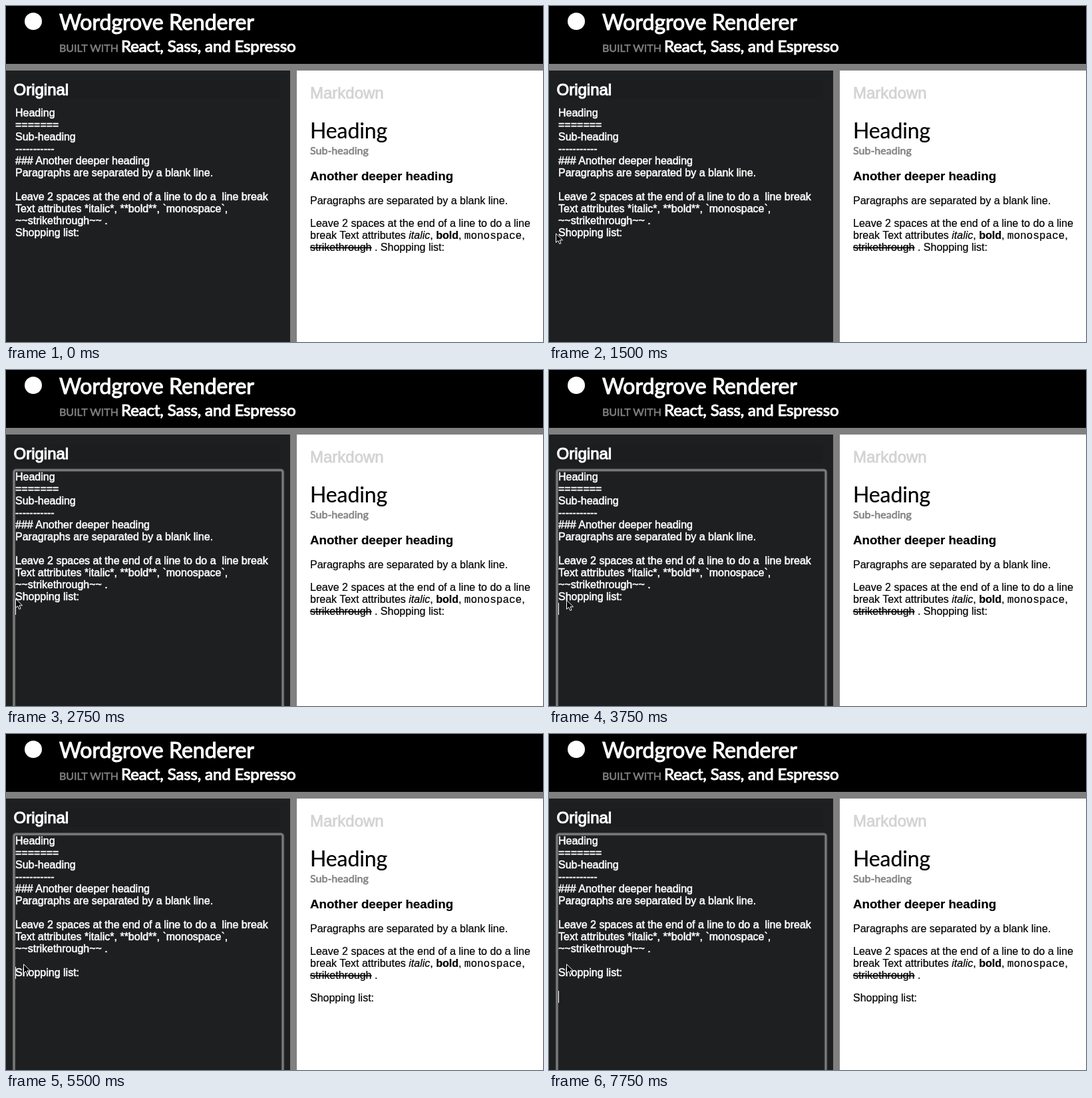
Recreate the animation shown at these times as an HTML page. Size 807x505 px, loop 8 s.

```html
<!DOCTYPE html>
<html lang="en">
<head>
<meta charset="utf-8">
<title>Wordgrove Renderer</title>
<style>
html, body { margin: 0; width: 100%; height: 100%; overflow: hidden; background: #808080; }
svg { display: block; }
text { font: 16px "Liberation Sans", Arial, sans-serif; white-space: pre; stroke: #000; stroke-width: .2; }
.lato { font-family: Lato, sans-serif; }
.white { fill: #fff; stroke: #fff; stroke-width: .55; }
.gray { fill: #808080; stroke: #808080; stroke-width: .6; }
.pale { fill: #d3d3d3; stroke: #d3d3d3; stroke-width: .8; }
.thick { stroke-width: 1.1; }
.tight { letter-spacing: -.12px; }
.h1 { font-size: 32px; }
.h2 { font-size: 24px; }
.h3 { font-size: 18.72px; font-weight: bold; }
.mono { font-family: "Liberation Mono", monospace; }
#ring rect { fill: none; }
</style>
</head>
<body>
<svg width="807" height="505" viewBox="0 0 807 505">
  <rect width="807" height="87"/>
  <rect y="97" width="427" height="408" fill="#1d1f20"/>
  <rect x="12" y="112" width="400" height="28" fill="#1b1d1e"/>
  <rect x="437" y="97" width="370" height="408" fill="#fff"/>

  <circle cx="41" cy="23" r="13" fill="#fff"/>
  <text class="lato white thick h1" x="80" y="36">Wordgrove Renderer</text>
  <text class="lato gray" x="80" y="69">BUILT WITH</text>
  <text class="lato white thick h2 tight" x="173" y="69">React, Sass, and Espresso</text>

  <text class="white thick h2" x="11.5" y="134">Original</text>
  <g id="ring">
    <rect x="12" y="150.5" width="404" height="400" rx="3" stroke="#3c3e3f" stroke-width="5"/>
    <rect x="12" y="150.5" width="404" height="400" rx="3" stroke="#616263" stroke-width="3.4"/>
    <rect x="12" y="150.5" width="404" height="400" rx="3" stroke="#858687" stroke-width="1.6"/>
  </g>
  <g id="editor"></g>

  <text class="pale h2" x="457" y="139">Markdown</text>
  <text class="lato h1 tight" x="457" y="199" stroke-width=".4">Heading</text>
  <text class="lato gray" x="457" y="223">Sub-heading</text>
  <text class="h3" x="457" y="262">Another deeper heading</text>
  <text x="457" y="298">Paragraphs are separated by a blank line.</text>
  <text x="457" y="332">Leave 2 spaces at the end of a line to do a line</text>
  <text x="457" y="350">break Text attributes <tspan font-style="italic">italic</tspan>, <tspan font-weight="bold">bold</tspan>, <tspan class="mono">monospace</tspan>,</text>
  <text x="457" y="368"><tspan text-decoration="line-through">strikethrough</tspan> .<tspan id="inline"> Shopping list:</tspan></text>
  <text id="block" x="457" y="402">Shopping list:</text>

  <rect id="caret" x="14" width="1" height="18" fill="#fff"/>
  <path id="pointer" d="M.5 1V14.5L3.6 11.6L5.8 16.5L8 15.6L6 10.9H10.5Z" stroke="#fff"/>
</svg>
<script>
const $ = id => document.getElementById(id);
const LOOP = 8000, FOCUS = 2750, SPLIT = 5500, TOP = 152, LINE = 18;

const lines = [
  "Heading", "=======", "Sub-heading", "-----------", "### Another deeper heading",
  "Paragraphs are separated by a blank line.", "",
  "Leave 2 spaces at the end of a line to do a  line break",
  "Text attributes *italic*, **bold**, `monospace`,", "~~strikethrough~~ ."
];

// [time, x, y]
const pointerSteps = [
  [750, 131, 257], [1000, 28, 338], [1250, 2, 348], [1500, 10, 341],
  [1750, 13, 343], [2000, 14, 343], [3500, 27, 345], [3750, 26, 345]
];

// [time, line]; each move restarts the blink
const caretSteps = [[2750, 11], [5000, 10], [5500, 11], [6000, 12], [6750, 13]];

function addLine(str, row) {
  const el = document.createElementNS("http://www.w3.org/2000/svg", "text");
  el.setAttribute("class", "white");
  el.setAttribute("x", 14);
  el.setAttribute("y", TOP + row * LINE + 14);
  el.textContent = str;
  $("editor").append(el);
  return el;
}

lines.forEach(addLine);
const list = addLine("Shopping list:", lines.length);

const latest = (steps, t) => steps.filter(s => s[0] <= t).pop();
const show = (el, on) => el.setAttribute("visibility", on ? "visible" : "hidden");

function draw(now) {
  const t = now % LOOP, split = t >= SPLIT;
  const pointer = latest(pointerSteps, t), caret = latest(caretSteps, t);

  show($("ring"), t >= FOCUS);
  show($("inline"), !split);
  show($("block"), split);
  list.setAttribute("y", TOP + (lines.length + split) * LINE + 14);

  show($("pointer"), pointer);
  if (pointer) $("pointer").setAttribute("transform", `translate(${pointer[1]} ${pointer[2]})`);

  show($("caret"), caret && (t - caret[0]) % 1000 < 500);
  if (caret) $("caret").setAttribute("y", TOP + caret[1] * LINE);
}

function tick() {
  draw(performance.now());
  requestAnimationFrame(tick);
}
tick();
</script>
</body>
</html>
```
